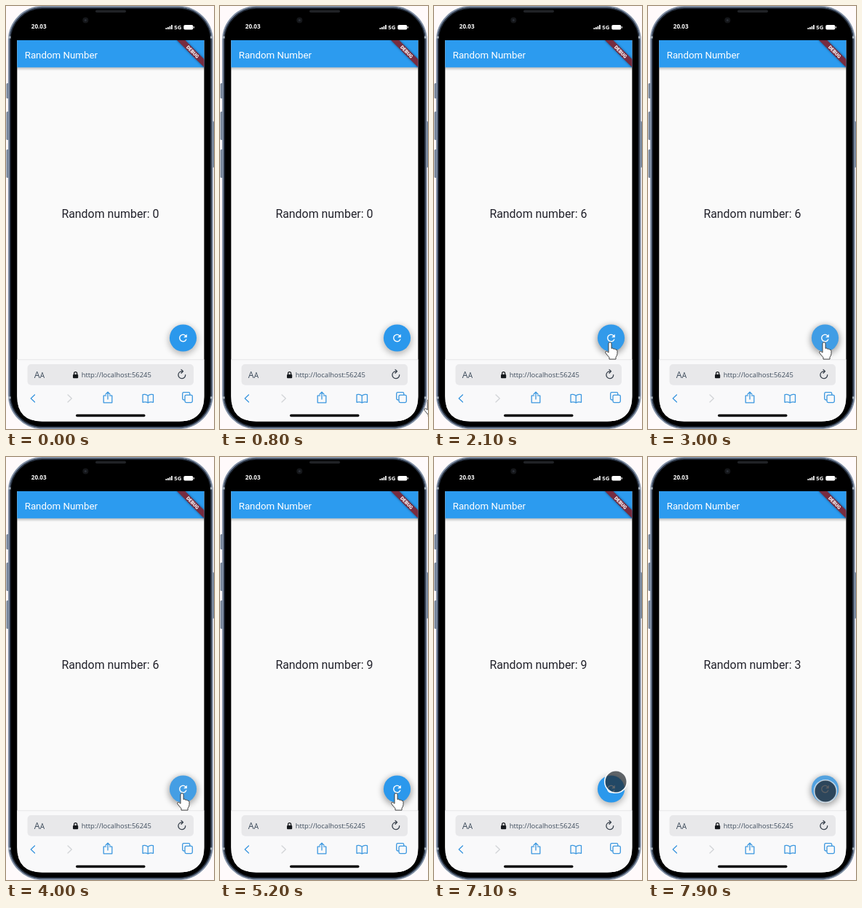
Recreate the animation shown at these times as an HTML page. Size 286 by 581 pixels, loop 8000 ms.

```html
<!DOCTYPE html>
<html lang="en">
<head>
<meta charset="utf-8">
<title>Random Number</title>
<style>
  html, body { margin: 0; width: 100%; height: 100%; overflow: hidden; background: #fffafb; }
  svg { display: block; width: 100vw; height: 100vh; }
  text { white-space: pre; }
  .app { font-family: Roboto, sans-serif; }
  .sys { font-family: "Open Sans", "Noto Sans", sans-serif; }
  .line { fill: none; stroke-width: 1.3; stroke-linecap: round; stroke-linejoin: round; }
</style>
</head>
<body>
<svg viewBox="0 0 286 581" preserveAspectRatio="none">
  <defs>
    <clipPath id="screenClip"><path d="M15.3 47H272.4V536Q272.4 570.5 238 570.5H50Q15.3 570.5 15.3 536Z"/></clipPath>
    <clipPath id="fabClip"><circle cx="243.5" cy="456" r="18.6"/></clipPath>
    <linearGradient id="barShadow" x2="0" y2="1">
      <stop offset="0" stop-color="#000" stop-opacity=".24"/>
      <stop offset="1" stop-color="#000" stop-opacity="0"/>
    </linearGradient>
    <filter id="soft" x="-60%" y="-60%" width="220%" height="220%"><feGaussianBlur stdDeviation="4.5"/></filter>
    <filter id="tight" x="-50%" y="-50%" width="200%" height="200%"><feGaussianBlur stdDeviation="1.6"/></filter>
  </defs>

  <!-- phone body -->
  <g fill="#76859a">
    <rect x=".5" y="106" width="5" height="21" rx="1.5"/>
    <rect x=".5" y="145" width="5" height="39" rx="1.5"/>
    <rect x=".5" y="197" width="5" height="39" rx="1.5"/>
    <rect x="281" y="158" width="5" height="64" rx="1.5"/>
  </g>
  <rect x="4" y="1.2" width="279.6" height="578.8" rx="46" fill="#000" stroke="#7c8ba1" stroke-width="2.2"/>
  <rect x="5.8" y="3" width="276" height="575.2" rx="44.2" fill="none" stroke="#2b3647" stroke-width="1.5"/>
  <path d="M3 43h3.5M281 43H284.5M3 538h3.5M281 538H284.5" stroke="#a9b3bf" stroke-width="3"/>
  <rect x="123" y="5.5" width="42" height="3.5" rx="1.7" fill="#202226"/>
  <circle cx="109.3" cy="19.5" r="4" fill="#15171a"/>
  <circle cx="109.3" cy="19.5" r="1.5" fill="#2a2e37"/>

  <!-- status row -->
  <g fill="#fff" class="sys" font-weight="700">
    <text x="34.8" y="31" font-size="8.1">20.03</text>
    <text x="231.3" y="32" font-size="7.8">5G</text>
    <path d="M219.5 30h1.7v2h-1.7zM222 29h1.7v3H222zM224.6 27.7h1.7V32h-1.7zM227.1 26h1.7v6h-1.7z"/>
    <rect x="244.3" y="26" width="13" height="6.6" rx="1.8"/>
    <rect x="257.9" y="28" width="1" height="2.6" rx=".5"/>
  </g>

  <g clip-path="url(#screenClip)">
    <rect x="15" y="47" width="258" height="524" fill="#fafafa"/>

    <!-- app bar -->
    <rect x="15" y="84" width="258" height="5" fill="url(#barShadow)"/>
    <rect x="15" y="47" width="258" height="37.3" fill="#2c9bef"/>
    <text class="app" x="25.7" y="71.5" font-size="13.3" fill="#fff">Random Number</text>
    <g transform="translate(272.6 47) rotate(45)">
      <rect x="-27" y="18.6" width="54" height="7.9" fill="#000" opacity=".5" filter="url(#tight)"/>
      <rect x="-27" y="18.6" width="54" height="7.9" fill="#772c40"/>
      <text class="app" y="24.9" font-size="6.7" font-weight="900" text-anchor="middle" fill="#fff">DEBUG</text>
    </g>

    <text class="app" x="76.4" y="290.7" font-size="15.9" fill="#22222b">Random number: <tspan id="num">0</tspan></text>

    <!-- action button -->
    <circle id="shade" cx="243.5" cy="458.5" r="20" fill="#000" filter="url(#soft)"/>
    <circle cx="243.5" cy="456" r="18.6" fill="#2b98ec"/>
    <g clip-path="url(#fabClip)"><circle id="splash" cx="243.5" cy="460" fill="#bbb"/></g>
    <path transform="translate(235.4 448) scale(.67)" fill="#fff" d="M17.65 6.35C16.2 4.9 14.21 4 12 4c-4.42 0-7.99 3.58-7.99 8s3.57 8 7.99 8c3.73 0 6.84-2.55 7.73-6h-2.08c-.82 2.33-3.04 4-5.65 4-3.31 0-6-2.69-6-6s2.69-6 6-6c1.66 0 3.14.69 4.22 1.78L13 11h7V4l-2.35 2.35z"/>

    <!-- browser bar -->
    <rect x="15" y="486" width="258" height="85" fill="#f9f9fa"/>
    <path d="M15 485.8H273" stroke="#e6e6e8"/>
    <rect x="29.5" y="492" width="228.5" height="28.7" rx="5" fill="#e8e8ea"/>
    <g class="sys" fill="#3e4c5c">
      <text x="38.8" y="511.4" font-size="12.4">A</text>
      <text x="46.8" y="511.4" font-size="10">A</text>
      <text x="103.7" y="510" font-size="9.38">http://localhost:56245</text>
    </g>
    <rect x="92" y="506" width="7.2" height="5.3" rx="1" fill="#15181c"/>
    <path d="M93.6 506.5V504.6a2 2 0 0 1 4 0V506.5" class="line" stroke="#15181c"/>
    <path d="M246.7 506.7a4.9 4.9 0 1 1-4.7-4.9h1.2M241 499.4l2.5 2.4-2.5 2.4" class="line" stroke="#39424d"/>
    <g class="line" stroke="#3b97df">
      <path d="M39.5 534l-5.3 5 5.3 5"/>
      <path d="M85 534l5.3 5-5.3 5" stroke="#d2d4d7"/>
      <path d="M137.5 535.2H134.2V544.8H145.8V535.2H142.5M140 540V530.5M137 533.2l3-3 3 3"/>
      <path d="M195.2 535.2Q191.5 532.4 188 533.8V544.3Q192 543.2 195.2 545Q198.5 543.2 202.5 544.3V533.8Q199 532.4 195.2 535.2V545"/>
      <path d="M245.3 541H244.5Q242.7 541 242.7 539.2V532.5Q242.7 530.7 244.5 530.7H251Q252.8 530.7 252.8 532.5V533.8"/>
      <rect x="246" y="534.3" width="10.3" height="10.3" rx="1.8"/>
    </g>
    <rect x="96" y="560.8" width="95.5" height="3.4" rx="1.7" fill="#050505"/>
  </g>

  <!-- pointers -->
  <path id="hand" fill="#fff" stroke="#444" stroke-linejoin="round"
    d="M-2 2Q-2 0 0 0Q2 0 2 2V8.5Q4 7.4 5 9.4Q7 8.4 7.8 10.3Q10 9.7 10 12V16Q9.8 18.5 8 20.5V23.3H-1V21L-6 15Q-7 12.6-4.6 12.3L-2 14.3Z"/>
  <circle id="touch" r="15.3" fill="#20262c" stroke="#fff" stroke-width="1.6"/>
</svg>
<script>
  const LOOP = 8000, STEP = 100, PRESS = 7500;
  const taps = [1600, 2700, 3200, 3900, 4700, 5200, 5900, PRESS];
  const digits = [[0, 0], [1800, 6], [4100, 9], [7700, 3]];
  const handPath = [[700, 290, 545], [1400, 240, 461.8], [1500, 242, 461.8], [6700, 242, 461.8], [6900, 250, 447]];
  const touchPath = [[7100, 250, 446], [PRESS, 244, 459], [LOOP, 244, 459]];

  const el = id => document.getElementById(id);
  const set = (id, attrs) => {
    for (const k in attrs) el(id).setAttribute(k, attrs[k]);
  };
  const clamp = v => Math.min(1, Math.max(0, v));
  const ease = v => v * v * (3 - 2 * v);
  const show = on => on ? "visible" : "hidden";

  function along(path, t) {
    let i = 0;
    while (i < path.length - 2 && t >= path[i + 1][0]) i++;
    const [t0, x0, y0] = path[i], [t1, x1, y1] = path[i + 1];
    const p = ease(clamp((t - t0) / (t1 - t0)));
    return `translate(${x0 + (x1 - x0) * p} ${y0 + (y1 - y0) * p})`;
  }

  function draw(t) {
    const pressed = t >= PRESS;
    set("hand", { transform: along(handPath, t), visibility: show(t >= 700 && t < 6900) });
    set("touch", {
      transform: along(touchPath, t),
      visibility: show(t >= 7100),
      "fill-opacity": pressed ? .74 : .7,
      "stroke-opacity": pressed ? .65 : .95
    });

    // a splash grows from the tap, holds, then fades
    const last = taps.filter(s => s <= t).pop() ?? -Infinity;
    const age = t - last;
    const fade = pressed ? 1 : clamp((600 - age) / 350);
    set("splash", {
      r: 26 * ease(clamp(age / 100)),
      opacity: (pressed ? .28 : .17) * fade
    });
    const hover = t >= 1300 && t < 6800;
    set("shade", { opacity: pressed || hover && age < 600 ? .36 : hover ? .32 : .26 });

    el("num").textContent = digits.filter(d => d[0] <= t).pop()[1];
  }

  function tick() {
    draw(Math.floor(performance.now() % LOOP / STEP) * STEP);
    requestAnimationFrame(tick);
  }
  tick();
</script>
</body>
</html>
```
